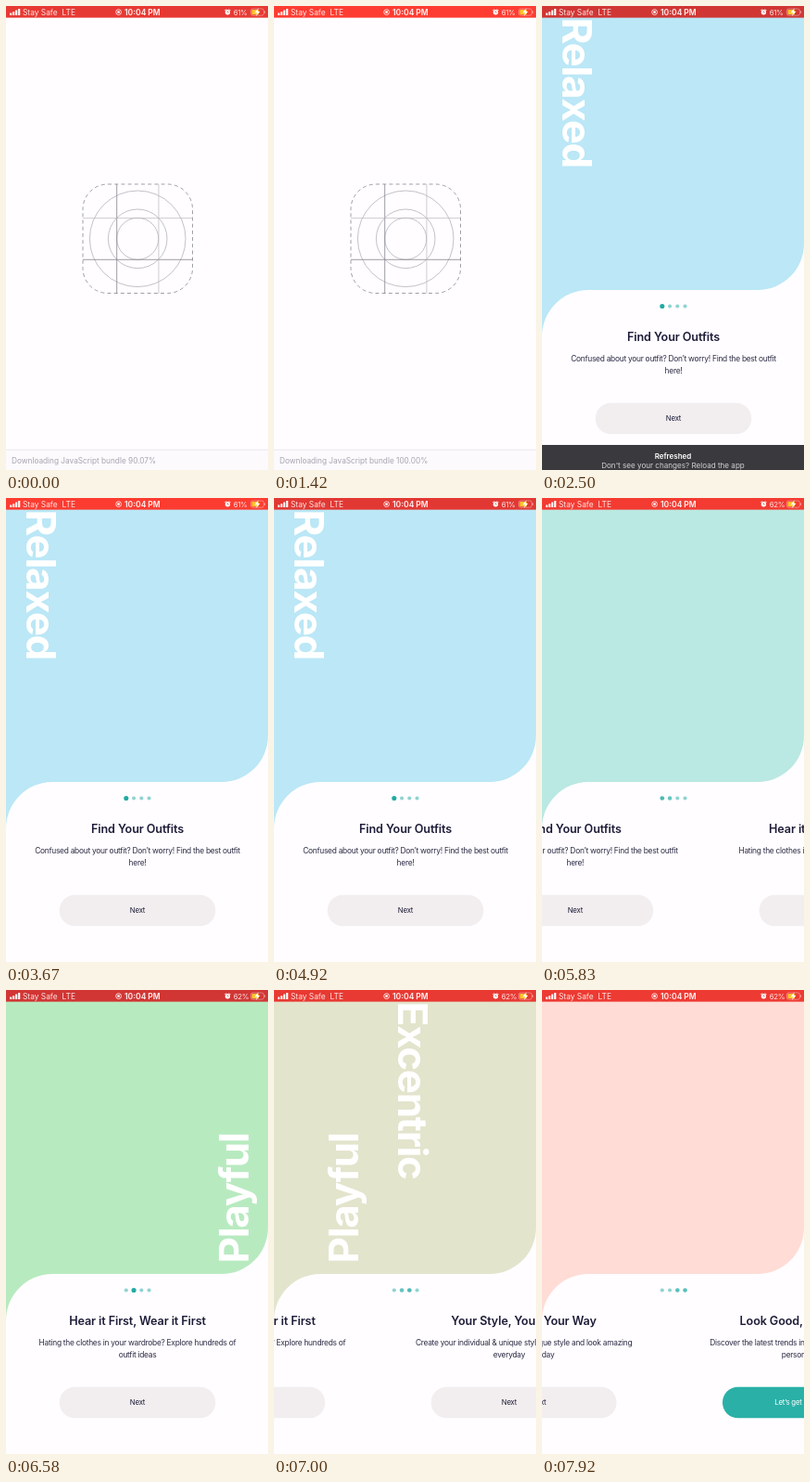
Animation, 283 px wide and 500 px high, one loop 8000 ms. Source, as an HTML page:

```html
<!DOCTYPE html>
<html lang="en">
<head>
<meta charset="utf-8">
<title>Outfit onboarding</title>
<style>
  html, body { margin: 0; width: 100%; height: 100%; overflow: hidden; background: #fffdff; }
  svg { display: block; width: 100vw; height: 100vh; }
  text { font: 8.4px Inter, "Open Sans", sans-serif; fill: #1d1c38; }
  .mid { text-anchor: middle; }
  .label { font-size: 44px; font-weight: 700; letter-spacing: -1.3px; fill: #fff; }
  .title { font-size: 12.6px; font-weight: 600; letter-spacing: -.1px; }
  .body { letter-spacing: -.27px; fill: #2b2b44; }
  .next { font-size: 7.8px; letter-spacing: -.2px; }
  .bar text { fill: #fff; fill-opacity: .88; }
  .bar .clock { font-weight: 700; }
  .bar #charge { font-size: 7.9px; letter-spacing: -.4px; }
  #loading { font-size: 8.25px; fill: #a6a5ae; }
  #banner text { font-size: 8.1px; fill: #d2d1d4; }
  #banner .head { font-size: 8px; font-weight: 600; fill: #fff; }
  #pages g:last-child .next { fill: #fff; }
</style>
</head>
<body>
<svg viewBox="0 0 283 500">
  <rect width="283" height="500" fill="#fffdff"/>

  <g id="splash">
    <g fill="none" stroke="#a9a8b1" stroke-width=".7">
      <rect x="83" y="192" width="118.5" height="117.5" rx="27" stroke="#96959f" stroke-width=".9" stroke-dasharray="4 3.2"/>
      <circle cx="142.2" cy="250.8" r="51.8"/>
      <circle cx="142.2" cy="250.8" r="31.8"/>
      <circle cx="142.2" cy="250.8" r="22.5"/>
      <path d="M119.7 192V310M83 273.3H202" stroke="#85848d" stroke-width=".8"/>
      <path d="M164.9 192V310M83 228.6H202" stroke="#bab9c1"/>
    </g>
    <rect y="478" width="283" height="22" fill="#fcfafd"/>
    <path d="M0 478.2H283" stroke="#e6e4e9" stroke-width=".8"/>
    <text id="loading" x="6" y="493.2"></text>
  </g>

  <g id="app">
    <path id="hero" d="M0 0H283V256A50 50 0 0 1 233 306H50A50 50 0 0 0 0 356Z"/>
    <g id="pages"></g>
    <g id="dots" fill="#22aaa2"></g>
    <g id="banner">
      <rect y="473" width="283" height="27" fill="#3a393d"/>
      <text class="mid head" x="141.5" y="487.8">Refreshed</text>
      <text class="mid" x="141.5" y="497.6">Don't see your changes? Reload the app</text>
    </g>
  </g>

  <g class="bar">
    <rect id="status" width="283" height="12.6"/>
    <path d="M5.2 10V7.6M8.2 10V6.2M11.2 10V4.6M14.2 10V3" stroke="#fff" stroke-width="2.1"/>
    <text x="18" y="9.6">Stay Safe</text>
    <text x="60.6" y="9.6">LTE</text>
    <circle cx="121.6" cy="6.6" r="2.9" fill="none" stroke="#fff" stroke-width=".8"/>
    <circle cx="121.6" cy="6.6" r="1.4" fill="#fff"/>
    <text class="clock" x="128" y="9.7">10:04 PM</text>
    <circle cx="239.4" cy="6.8" r="2.7" fill="#fff"/>
    <path d="M236.4 5L238 3.4M242.4 5L240.8 3.4" stroke="#fff"/>
    <path d="M239.4 5.2V7H240.8" fill="none" stroke="#e0453d" stroke-width=".6"/>
    <text id="charge" x="245.8" y="9.5"></text>
    <rect x="264.4" y="3" width="14" height="7.2" rx="2" fill="none" stroke="#fff" stroke-opacity=".5" stroke-width=".7"/>
    <path d="M279.6 5.4V7.8" stroke="#fff" stroke-opacity=".5"/>
    <rect x="265.4" y="4" width="7.6" height="5.2" rx="1" fill="#fcc42c"/>
    <path d="M272.6 2.2L268.6 7.2H271.2L270 11L274.6 5.8H271.8Z" fill="#fff"/>
  </g>
</svg>

<script>
const LOOP = 8000, WIDTH = 283, APP_AT = 1900, BANNER_END = 2950, CHARGE_AT = 5400;
const SWIPES = [5666, 6760, 7711], SWIPE_MS = 700;
const pages = [
  ["Relaxed", "Find Your Outfits", ["Confused about your outfit? Don’t worry! Find the best outfit", "here!"], [187, 231, 246]],
  ["Playful", "Hear it First, Wear it First", ["Hating the clothes in your wardrobe? Explore hundreds of", "outfit ideas"], [184, 234, 192]],
  ["Excentric", "Your Style, Your Way", ["Create your individual & unique style and look amazing", "everyday"], [255, 224, 212]],
  ["Funky", "Look Good, Feel Good", ["Discover the latest trends in fashion and explore your", "personality"], [255, 216, 215]]
];
const $ = id => document.getElementById(id);
const clamp = x => Math.min(1, Math.max(0, x));
const mix = (a, b, k) => `rgb(${a.map((v, i) => Math.round(v + (b[i] - v) * k))})`;
const show = (id, on) => $(id).style.display = on ? "" : "none";
const line = (type, y, s) => `<text class="mid ${type}" x="142" y="${y}">${s.replace("&", "&amp;")}</text>`;

$("pages").innerHTML = pages.map(([label, title, body], i) => {
  const last = i === pages.length - 1;
  const turn = i % 2 ? "translate(261.8 294.5) rotate(-90)" : "translate(22 12.5) rotate(90)";
  return `<g transform="translate(${i * WIDTH})">
    <text class="label" transform="${turn}">${label}</text>
    ${line("title", 360.7, title)}${line("body", 382.8, body[0])}${line("body", 396, body[1])}
    <rect x="57.7" y="427.7" width="168.6" height="33.6" rx="16.8" fill="${last ? "#2ab0a7" : "#f2eeef"}"/>
    ${line("next", 447.4, last ? "Let’s get started" : "Next")}
  </g>`;
}).join("");
$("dots").innerHTML = pages.map((_, i) => `<circle cx="${129.8 + i * 8.25}" cy="323.5"/>`).join("");

// A quick flick that settles softly on the next page.
function swipe(u) {
  const v = 1 - (1 - clamp(u)) ** 2;
  return v * v * (3 - 2 * v);
}

function draw(t) {
  const pulse = .5 + .5 * Math.cos((t - 1500) / 1000 * Math.PI);
  $("status").setAttribute("fill", mix([208, 54, 52], [255, 60, 49], pulse));
  $("charge").textContent = t < CHARGE_AT ? "61%" : "62%";

  const tick = Math.floor(t / 83.3) * 83.3;
  const percent = 90.07 + 9.93 * clamp(tick / 1240);
  $("loading").textContent = `Downloading JavaScript bundle ${percent.toFixed(2)}%`;
  show("splash", t < APP_AT);
  show("app", t >= APP_AT);
  show("banner", t < BANNER_END);

  const pos = SWIPES.reduce((sum, s) => sum + swipe((t - s) / SWIPE_MS), 0);
  const from = Math.min(Math.floor(pos), pages.length - 2);
  $("hero").setAttribute("fill", mix(pages[from][3], pages[from + 1][3], pos - from));
  $("pages").setAttribute("transform", `translate(${-pos * WIDTH})`);
  [...$("dots").children].forEach((dot, i) => {
    const active = clamp(1 - Math.abs(i - pos));
    dot.setAttribute("r", 2.05 + .5 * active);
    dot.setAttribute("opacity", .5 + .5 * active);
  });
}

const start = performance.now();
function frame() {
  draw((performance.now() - start) % LOOP);
  requestAnimationFrame(frame);
}
frame();
</script>
</body>
</html>
```
